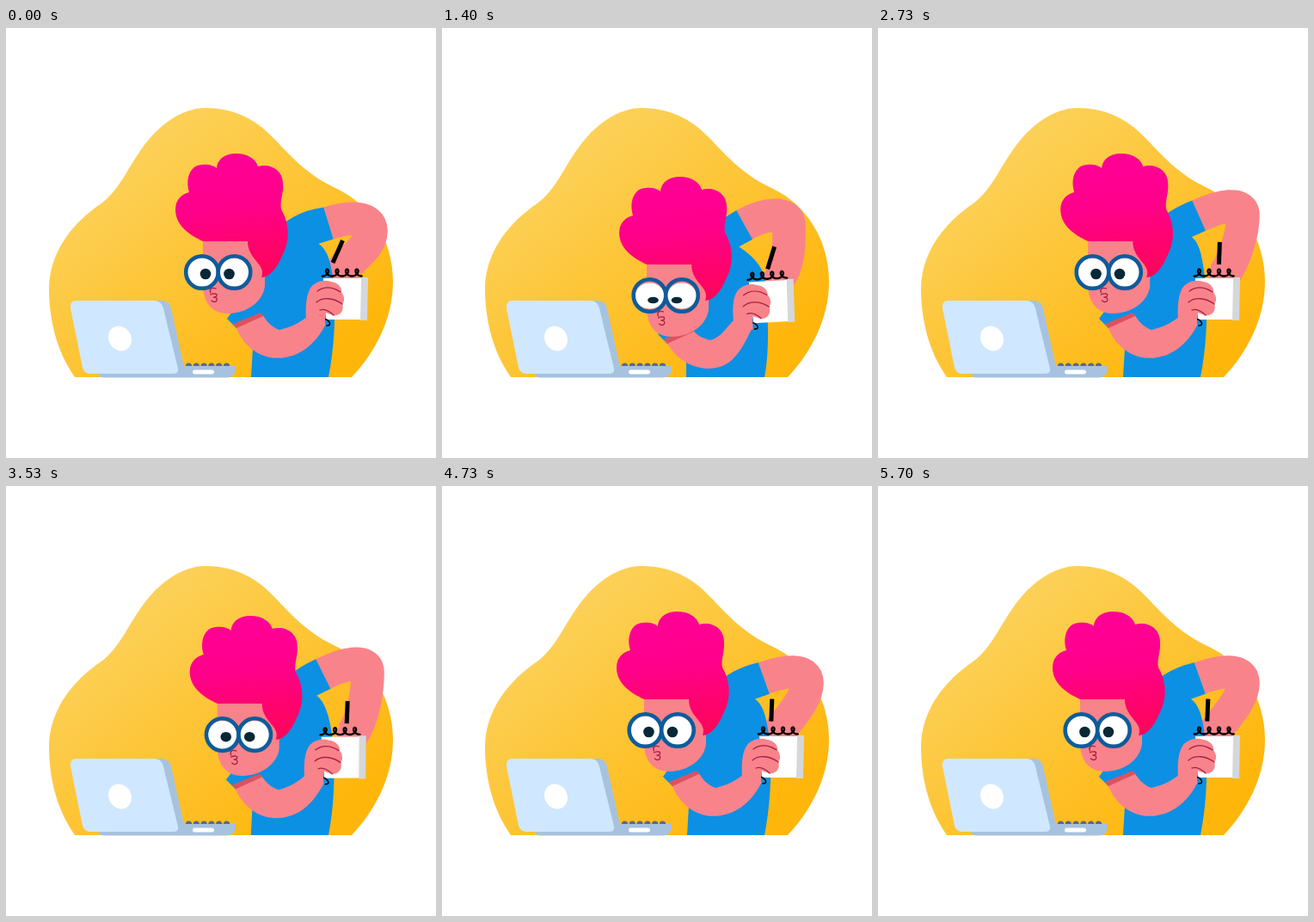
Animation of 500 by 500 pixels, one loop 5.73 s. Source, as an HTML page:

```html
<!DOCTYPE html>
<html lang="en">
<head>
<meta charset="utf-8">
<title>Taking notes</title>
<style>
  html, body { margin: 0; width: 100%; height: 100%; overflow: hidden; background: #fff; }
  svg { display: block; width: 100vw; height: 100vh; }
  .skin { fill: #f9838b; }
  .shirt { fill: #0b90e4; }
  .metal { fill: #a6c2de; }
  .crease { fill: none; stroke: #a91f45; stroke-width: 1.3; stroke-linecap: round; }
  .ring { fill: none; stroke: #000; stroke-linecap: round; stroke-linejoin: round; }
</style>
</head>
<body>
<svg viewBox="0 0 500 500">
  <defs>
    <linearGradient id="sun" gradientUnits="userSpaceOnUse" x1="140" y1="130" x2="350" y2="400">
      <stop offset="0" stop-color="#fcd25c"/>
      <stop offset="1" stop-color="#ffb60b"/>
    </linearGradient>
    <linearGradient id="pink" gradientUnits="userSpaceOnUse" x1="255" y1="150" x2="270" y2="285">
      <stop offset="0" stop-color="#ff0096"/>
      <stop offset=".4" stop-color="#ff008c"/>
      <stop offset="1" stop-color="#fe055c"/>
    </linearGradient>
  </defs>

  <path fill="url(#sun)" d="M80 406C60 377 50 342 50 302C51 262 75 230 105 208C130 193 140 165 158 140C178 112 205 93 232 93C270 93 294 110 312 129C333 151 352 172 385 187C423 205 450 246 450 295C450 340 427 380 402 406Z"/>

  <path id="arm" fill="none" stroke="#f9838b" stroke-width="38.500"/>
  <circle id="fist" class="skin" r="17.5"/>
  <path id="pencil" stroke="#000" stroke-width="5"/>
  <path id="shirt" class="shirt"/>

  <g id="pad">
    <path fill="#fff" d="M369 291H414V339H372Z"/>
    <path fill="#d5d7da" d="M413 290H421L420 340H412Z"/>
    <path id="coil" class="ring" stroke-width="2.3"/>
    <path class="ring" stroke-width="1.6" d="M370 338q4 1 6 4q2 4-3 4"/>
  </g>

  <path id="sleeveArm" class="skin"/>
  <path id="hem" fill="#dc5260"/>

  <g id="hand">
    <path class="skin" d="M349 338C348 325 349 308 355 301C360 295 370 292 378 295C386 296 391 302 390 307C394 312 394 318 391 321C394 328 388 336 380 334C376 333 373 331 371 331L371 346L356 352Z"/>
    <path class="crease" d="M362 306C370 300 380 301 389 307M361 319C368 313 380 313 391 321M365 328C370 326 376 329 381 334"/>
  </g>

  <g id="head">
    <path class="skin" d="M229 247V298C229 320 240 332 258 332C280 332 299 318 301 300V247Z"/>
    <path fill="url(#pink)" d="M229 248C212 240 197 229 197 211C197 199 205 193 213 191C208 174 215 159 228 159C236 158 241 160 245 163C246 151 257 146 267 146C281 146 290 152 293 161C307 157 322 165 322 181C323 193 318 201 320 211C330 228 330 248 322 263C315 280 306 290 297 290C303 274 281 270 281 248Z"/>
    <g id="look">
      <path class="crease" d="M244 303c-5-2-8 1-6 5M238 310c4-2 8-1 7 1c0 2-3 2-4 2c4 0 5 2 4 4c-1 2-4 2-6 0"/>
      <g id="eyes"></g>
    </g>
  </g>

  <g id="keys" fill="#566b89"></g>
  <path class="metal" d="M107 400L200 393H267Q268 406.500 256 406.500H113Q108 406 107 400Z"/>
  <rect x="217" y="397.5" width="25" height="5" rx="2.5" fill="#fff"/>
  <path class="metal" d="M82 317H180Q190 317 192 326L207 394Q208 402 200 402H180Z"/>
  <path fill="#cfe7ff" d="M82 317H172Q181 317 183 326L200 396Q201 402 194 402H98Q91 402 89 395L75 326Q74 317 82 317Z"/>
  <ellipse cx="132.500" cy="361" rx="13" ry="15" fill="#fff" transform="rotate(-30 132.500 361)"/>
</svg>

<script>
const LOOP = 5730, CYCLE = 24;
const $ = id => document.getElementById(id);
const set = (id, attrs) => {
  for (const name in attrs) $(id).setAttribute(name, attrs[name]);
};
const repeat = (n, make) => Array.from({ length: n }, (_, i) => make(i)).join('');

function ease(from, to, x) {
  const u = Math.min(1, Math.max(0, (x - from) / (to - from)));
  return u * u * (3 - 2 * u);
}

// 25 steps a second, shown on a 30 Hz grid: one step in five stays twice as long
function stepAt(ms) {
  const tick = Math.floor((ms + 5) * .03);
  return (Math.floor(tick / 6) * 5 + Math.max(0, tick % 6 - 1)) % CYCLE;
}

function draw(step) {
  // Head and pencil pan right, then snap back; the body dips once; the pencil scribbles
  const pan = ease(4, 16, step) - ease(19, 24, step);
  const bend = (1 + Math.cos(Math.PI * Math.min(1, Math.abs(step - 11) / 7))) / 2;
  const scribble = Math.cos(step * Math.PI / 3);
  const at = (x, y, dx, dy) => `${x + dx * bend} ${y + dy * bend} `;

  drawArm(pan, bend, scribble, at);

  const shoulder = (x, y) => at(x, y, -6, 18);
  const belly = (x, y) => at(x, y, -6, 12);
  const wrist = (x, y) => at(x, y, -11, 4);
  set('sleeveArm', { d: `M${shoulder(267, 346)}C${belly(275, 371)}${belly(299, 388)}${belly(325, 383)}` +
    `C${belly(348, 379)}${wrist(363, 362)}${wrist(372, 344)}L${wrist(352, 334)}` +
    `C${wrist(342, 343)}${belly(331, 348)}${belly(318, 351)}` +
    `C${belly(309, 348)}${shoulder(303, 341)}${shoulder(298, 333)}Z` });
  set('hem', { d: `M${shoulder(264, 344)}L${shoulder(296, 331)}L${shoulder(299, 335)}L${shoulder(268, 349)}Z` });

  const transform = `translate(${-11 * bend} ${3 * bend}) rotate(${-3 * bend} 395 315)`;
  set('pad', { transform });
  set('hand', { transform });

  set('head', { transform: `translate(${17 * pan - 1.5 * bend} ${27 * bend})` });
  set('look', { transform: `translate(${7 * pan} 0)` });
  for (const white of document.querySelectorAll('.white')) white.setAttribute('ry', 17 - 2 * bend);
  for (const pupil of document.querySelectorAll('.pupil')) {
    pupil.setAttribute('cy', 286 + 3.5 * bend);
    pupil.setAttribute('ry', 6.3 - 2.5 * bend);
  }
}

function drawArm(pan, bend, scribble, at) {
  const dir = deg => [Math.cos(deg * Math.PI / 180), Math.sin(deg * Math.PI / 180)];
  const angle = -17 - 8 * pan - 7 * bend;
  const [cos, sin] = dir(angle), [slopeX, slopeY] = dir(angle * 1.9 + 25);
  const sx = 375 - 2 * pan - 22 * bend, sy = 227 - 10 * pan + 8 * bend;
  const ex = 424.5 - 21 * bend, ey = 236 - 20 * pan + 6 * bend;
  const fx = 385 + 20 * pan + 2 * scribble - 7 * bend, fy = 286 + 2 * pan + 4 * bend;
  const px = 376 + 25 * pan + 4 * scribble - 15 * bend, py = 273 + 2 * pan + 6 * bend;
  const top = [sx + 19.3 * sin, sy - 19.3 * cos], low = [sx - 19.3 * sin, sy + 19.3 * cos];
  const pit = [low[0] - 18 * cos, low[1] - 18 * sin];

  set('arm', { d: `M${sx} ${sy}C${sx + 27 * cos} ${sy + 27 * sin} ${ex} ${ey - 17} ${ex} ${ey}` +
    `C${ex} ${ey + 20} ${fx + 13} ${fy - 18} ${fx} ${fy}` });
  set('fist', { cx: fx, cy: fy });
  set('pencil', { d: `M${px} ${py}l${4.5 + 7 * scribble} -26` });
  set('shirt', { d: `M${at(285, 406, -1, 0)}L${at(287, 372, -3, 13)}L${at(268, 349, -6, 18)}L${at(257, 338, -6, 18)}` +
    `L${at(285, 300, 0, 20)}L305 245Q${top[0] - 40 * slopeX} ${top[1] - 40 * slopeY} ${top}L${low}L${pit}` +
    `C${pit[0] + 10} ${pit[1] + 7} ${at(378, 270, -4, 4)}${at(381, 298, -4, 0)}` +
    `C${at(384, 340, -5, 0)}381 375 375 406Z` });
}

// Spiral binding: a looping trochoid along the top of the pad
set('coil', { d: 'M' + repeat(81, i => {
  const t = Math.PI * (i / 10 - 1);
  return `${373.5 + 1.83 * t - 4 * Math.sin(t)} ${284.5 - 4 * Math.cos(t)} `;
}) });

const lens = x => `<circle cx="${x}" cy="284" r="19" fill="#f9838b"/>
  <ellipse class="white" cx="${x}" cy="284.500" rx="17" ry="17" fill="#fff"/>
  <circle cx="${x}" cy="284" r="18.8" fill="none" stroke="#0d5c9b" stroke-width="4.6"/>`;
const pupil = x => `<ellipse class="pupil" cx="${x}" cy="286" rx="6.3" ry="6.3" fill="#082838"/>`;
$('eyes').innerHTML = lens(228) + lens(265.5) + pupil(232) + pupil(259.5);
$('keys').innerHTML = repeat(6, i => `<circle cx="${212.5 + i * 8.8}" cy="393" r="3.6"/>`);

const start = performance.now();
function tick() {
  draw(stepAt((performance.now() - start) % LOOP));
  requestAnimationFrame(tick);
}
tick();
</script>
</body>
</html>
```
